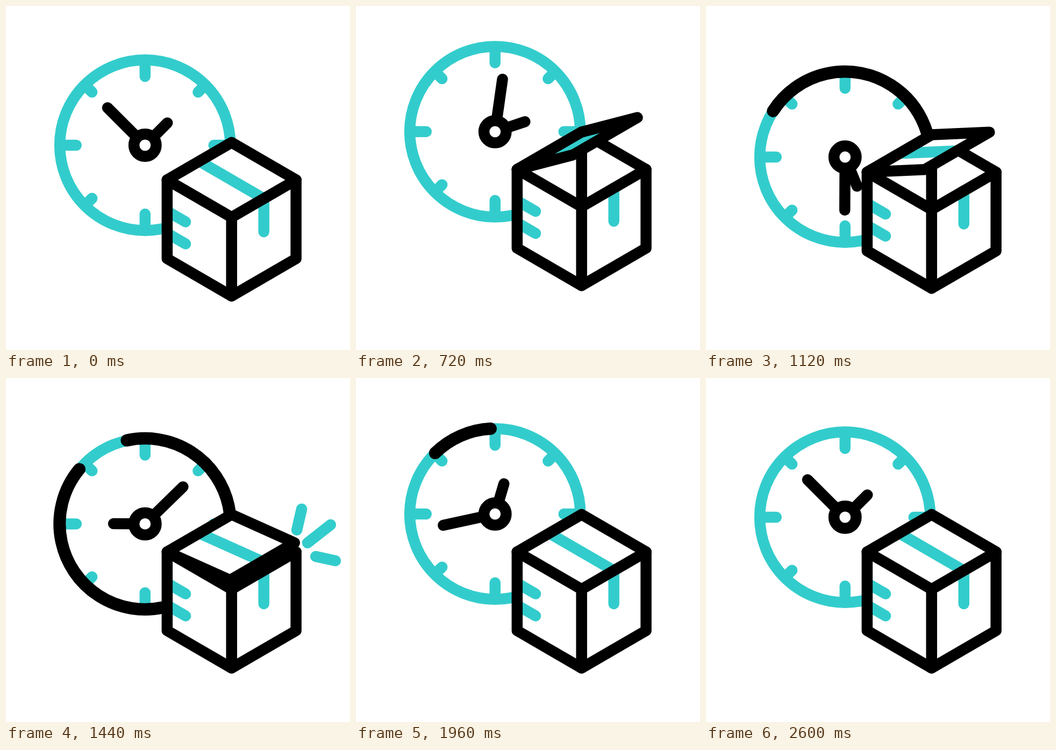
These frames come from a looping animation (640 by 640 pixels, 3000 ms). An HTML page with a canvas:

```html
<!DOCTYPE html>
<html lang="en">
<head>
<meta charset="utf-8">
<title>Delivery time</title>
<style>
html, body { margin: 0; width: 100%; height: 100%; overflow: hidden; background: #fff; }
canvas { display: block; width: 100vw; height: 100vh; }
</style>
</head>
<body>
<canvas id="stage" width="640" height="640"></canvas>
<script>
const ctx = document.getElementById('stage').getContext('2d');
const LOOP = 3000, STEP = 40;
const TEAL = '#33cccc', BLACK = '#000', WHITE = '#fff';
const LINE = 20.5;
const CLOCK_X = 258.7;
const RAD = Math.PI / 180;

const clamp = v => Math.min(1, Math.max(0, v));
const mix = (a, b, k) => a + (b - a) * k;
const smooth = p => p * p * (3 - 2 * p);
const span = (t, from, to) => clamp((t - from) / (to - from));

// Eased value through [time, value] keys.
function track(t, keys) {
  let value = keys[0][1];
  for (let i = 1; i < keys.length; i++) {
    const [t0, v0] = keys[i - 1], [t1, v1] = keys[i];
    if (t > t0) value = mix(v0, v1, smooth(span(t, t0, t1)));
  }
  return value;
}

// Cubic bezier easing with flat ends.
function flatBezier(p, x1, x2) {
  let lo = 0, hi = 1;
  for (let i = 0; i < 30; i++) {
    const m = (lo + hi) / 2, n = 1 - m;
    const x = 3 * n * n * m * x1 + 3 * n * m * m * x2 + m * m * m;
    if (x < p) lo = m; else hi = m;
  }
  return smooth(lo);
}

function stroke(color, width = LINE, cap = 'round') {
  ctx.strokeStyle = color;
  ctx.lineWidth = width;
  ctx.lineCap = cap;
  ctx.lineJoin = 'round';
  ctx.stroke();
}

function path(points, closed) {
  ctx.beginPath();
  points.forEach(([x, y]) => ctx.lineTo(x, y));
  if (closed) ctx.closePath();
}

function line(color, points, cap) {
  path(points);
  stroke(color, LINE, cap);
}

function fill(points) {
  path(points, true);
  ctx.fillStyle = WHITE;
  ctx.fill();
}

// Angles run clockwise from twelve o'clock.
function polar(cy, angle, r) {
  return [CLOCK_X + r * Math.sin(angle * RAD), cy - r * Math.cos(angle * RAD)];
}

function arc(color, cy, r, from, to, width) {
  ctx.beginPath();
  ctx.arc(CLOCK_X, cy, r, (from - 90) * RAD, (to - 90) * RAD);
  stroke(color, width);
}

function drawClock(t) {
  const cy = track(t, [[200, 259], [680, 233], [1200, 284.3], [1760, 251.5], [2440, 259]]);

  for (let a = 0; a < 360; a += 45) {
    line(TEAL, [polar(cy, a, 158), polar(cy, a, a % 90 ? 139.5 : 128)]);
  }
  arc(TEAL, cy, 158.7, 0, 360, LINE);

  const head = track(t, [[745, -57.4], [1625, 357]]);
  const tail = track(t, [[1262, -57.4], [2130, 357]]);
  if (head - tail > 0.05) arc(BLACK, cy, 159, tail, head, 23);

  const turn = flatBezier(span(t, 200, 2600), 0.54, 0.36);
  const hands = [[-45 + 720 * turn, 98.7], [45 + 360 * turn, 58.7]];
  for (const [angle, length] of hands) {
    line(BLACK, [polar(cy, angle, 22), polar(cy, angle, length)]);
  }
  ctx.beginPath();
  ctx.arc(CLOCK_X, cy, 20.7, 0, 2 * Math.PI);
  ctx.fillStyle = WHITE;
  ctx.fill();
  stroke(BLACK);
}

function drawRays(t) {
  const end = 1 - (1 - span(t, 1230, 1580)) ** 2;
  const start = smooth(span(t, 1280, 1680));
  if (end - start < 0.01) return;
  const rays = [[534.6, 311, 553, 231], [530, 331, 618, 262], [549.6, 326.3, 625, 342.6]];
  for (const [x0, y0, x1, y1] of rays) {
    line(TEAL, [start, end].map(k => [mix(x0, x1, k), mix(y0, y1, k)]));
  }
}

function drawBox(t) {
  const lift = track(t, [[200, 0], [520, 19.5], [1020, 19.5], [1320, 0]]);
  const open = track(t, [[200, 0], [520, 1], [1030, 1], [1320, 0], [1440, 0.175], [1560, 0]]);

  ctx.save();
  ctx.translate(0, -lift);
  const left = [299.8, 323.5], back = [419.7, 254], right = [539.6, 323.5], front = [419.7, 393];
  const lowLeft = [299.8, 470], bottom = [419.7, 539.6], lowRight = [539.6, 470];

  fill([left, back, right, lowRight, bottom, lowLeft]);
  line(TEAL, [[300, 381.8], [334, 401.5]]);
  line(TEAL, [[300, 422.8], [334, 442.5]]);
  line(TEAL, [[479.7, 358], [479.7, 420]]);
  line(BLACK, [back, front]);
  path([left, back, right, lowRight, bottom, lowLeft], true);
  stroke(BLACK);
  line(BLACK, [left, front, right]);
  line(BLACK, [front, bottom]);

  const swing = ([x, y]) => [x + 119.9 - 16 * open, y + 69.5 - 96.5 * open];
  const lid = [left, back, swing(back), swing(left)];
  const hinge = [359.8, 288.8];
  fill(lid);
  line(TEAL, [hinge, swing(hinge)], 'butt');
  path(lid, true);
  stroke(BLACK);
  ctx.restore();
}

function draw(now) {
  const t = Math.floor((now % LOOP) / STEP) * STEP;
  ctx.fillStyle = WHITE;
  ctx.fillRect(0, 0, 640, 640);
  drawClock(t);
  drawRays(t);
  drawBox(t);
}

let origin;
function tick(now) {
  origin ??= now;
  draw(now - origin);
  requestAnimationFrame(tick);
}
draw(0);
requestAnimationFrame(tick);
</script>
</body>
</html>
```
